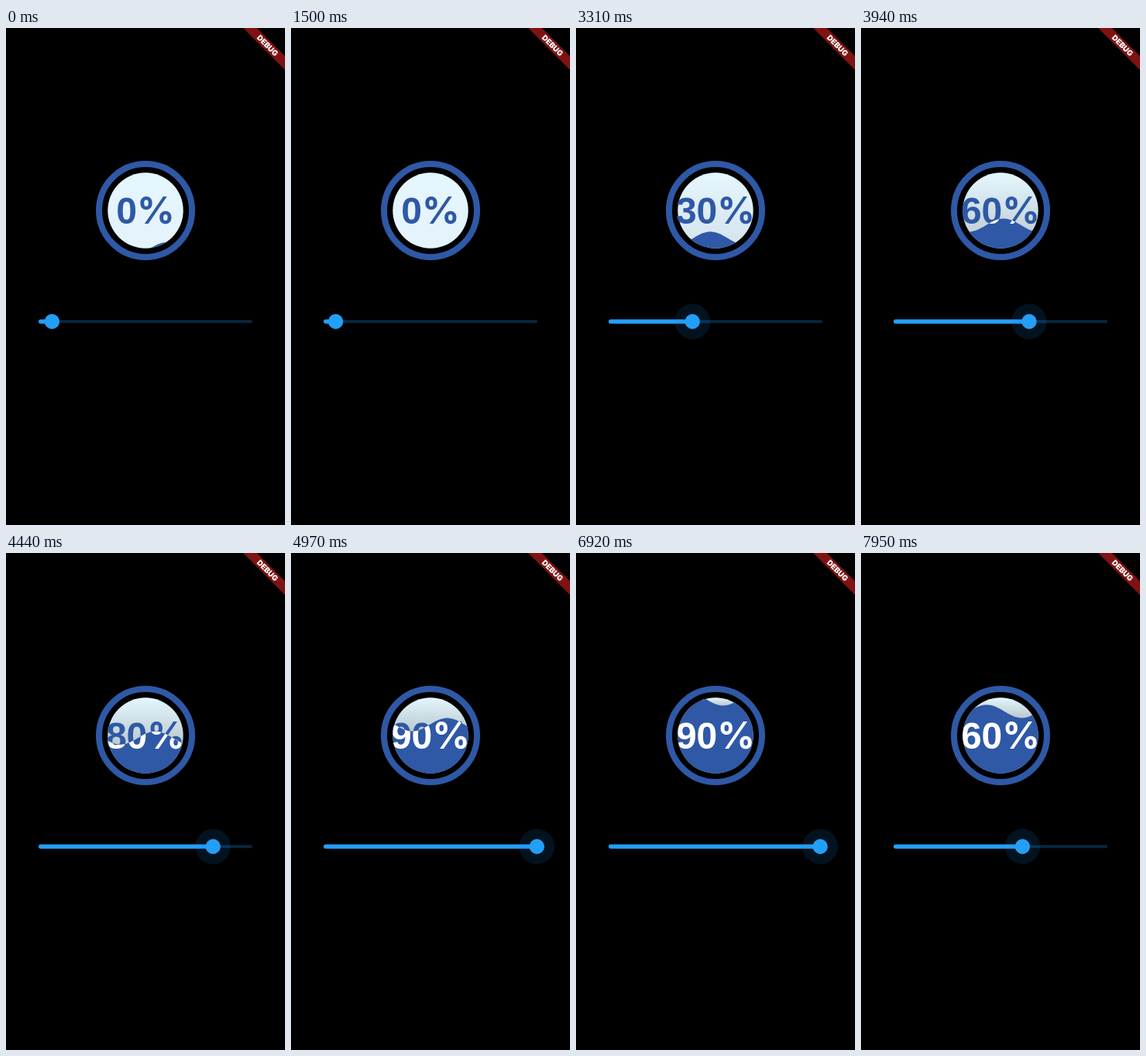
Write an HTML page that moves like this. It is 360 by 640 pixels and loops after 8000 ms.

```html
<!DOCTYPE html>
<html lang="en">
<head>
<meta charset="utf-8">
<title>Liquid progress</title>
<style>
  html, body { margin: 0; width: 100%; height: 100%; overflow: hidden; background: #000; }
  svg { display: block; width: 360px; height: 640px; }
  .label { font: bold 48px "Liberation Sans", Arial, sans-serif; text-anchor: middle; }
  .sign { font-family: Inter, sans-serif; }
  .debug { font: 900 9.8px Inter, sans-serif; text-anchor: middle; }
</style>
</head>
<body>
<svg viewBox="0 0 360 640">
  <defs>
    <clipPath id="bowl"><circle cx="180" cy="235" r="48.7"/></clipPath>
    <clipPath id="inner"><circle cx="180" cy="235" r="56"/></clipPath>
    <clipPath id="water"><path class="wave"/></clipPath>
    <linearGradient id="air" gradientUnits="userSpaceOnUse" x1="0" x2="0" y1="186">
      <stop stop-color="#e5f6fe"/>
      <stop id="shade" offset="1"/>
    </linearGradient>
  </defs>
  <rect width="360" height="640"/>

  <circle cx="180" cy="235" r="48.7" fill="url(#air)"/>
  <g clip-path="url(#inner)">
    <text class="label" x="180" y="251.5" fill="#2f58a6"><tspan class="number"></tspan><tspan class="sign">%</tspan></text>
  </g>
  <g clip-path="url(#bowl)">
    <path class="wave" fill="#2f58a6"/>
    <g clip-path="url(#water)">
      <text class="label" x="180" y="251.5" fill="#fff"><tspan class="number"></tspan><tspan class="sign">%</tspan></text>
    </g>
  </g>
  <circle cx="180" cy="235" r="60" fill="none" stroke="#2f58a6" stroke-width="8"/>

  <g fill="#239ff8">
    <rect id="rest" y="376.1" height="3.8" rx="1.9" opacity=".23"/>
    <rect id="done" x="42" y="375.2" height="5.6" rx="2.8"/>
    <circle id="halo" cy="378" fill="#1e88f0" opacity=".13"/>
    <circle id="thumb" cy="378" r="9.7"/>
  </g>

  <g transform="translate(360 0) rotate(45)">
    <rect x="-40" y="25.6" width="80" height="12.5" fill="#7f1212"/>
    <text class="debug" y="35.4" fill="#fff">DEBUG</text>
  </g>
</svg>
<script>
const LOOP = 8000, STEP = 103.2, OFFSET = 15;
const LEFT = 42, SPAN = 275.5;
const WAVELENGTH = 90, AMPLITUDE = 8.5, DRIFT = 0.017;
const EMPTY_Y = 284.5, DEPTH = 98, LAG = 1700;

// Slider drag: time, position, power of the easing that leads there
const drag = [
  [0, 59, 1], [1500, 56, 20], [2400, 79, 5], [3310, 149.5, .55], [3940, 217, 1.2],
  [4975, 317.5, 1], [6700, 317.5, 1], [7330, 265, 2.9], [7950, 208, .85]
];

function thumbX(t) {
  if (t <= 0) return drag[0][1];
  const i = drag.findIndex(key => key[0] > t);
  if (i < 0) return drag[drag.length - 1][1];
  const [t0, x0] = drag[i - 1], [t1, x1, power] = drag[i];
  return x0 + (x1 - x0) * ((t - t0) / (t1 - t0)) ** power;
}

const percent = t => Math.floor((thumbX(t) - LEFT) / SPAN * 10) * 10;

// The water trails the shown value: its mean over the last LAG ms
function fill(t, samples = 40) {
  let sum = 0;
  for (let i = 0; i < samples; i++) sum += percent(t - LAG * i / samples);
  return sum / samples / 100;
}

function wavePath(peak, level) {
  let d = "M120 300";
  for (let x = 120; x <= 240; x += 2) {
    const y = level - AMPLITUDE * Math.cos((x - peak) / WAVELENGTH * 2 * Math.PI);
    d += `L${x} ${y.toFixed(2)}`;
  }
  return d + "L240 300Z";
}

const $ = id => document.getElementById(id);
const all = name => document.querySelectorAll(name);
const set = (el, attrs) => { for (const k in attrs) el.setAttribute(k, attrs[k]); };
const mix = (a, b, p) => a.map((c, i) => Math.round(c + (b[i] - c) * p));
const waves = all(".wave"), numbers = all(".number");

function draw(time) {
  const t = Math.floor(time / STEP) * STEP + OFFSET;
  const x = thumbX(t), full = fill(t), level = EMPTY_Y - DEPTH * full;

  numbers.forEach(el => { el.textContent = percent(t); });
  const d = wavePath(207 + DRIFT * t, level);
  waves.forEach(el => set(el, { d }));

  set($("air"), { y2: level + AMPLITUDE });
  const dim = Math.min(1, full * 2.5);
  set($("shade"), { "stop-color": `rgb(${mix([229, 243, 251], [186, 201, 207], dim)})` });

  set($("rest"), { x, width: Math.max(0, LEFT + SPAN + .5 - x) });
  set($("done"), { width: x - LEFT });
  set($("halo"), { cx: x + .4, r: 22.8 * Math.min(1, Math.max(0, (t - 1400) / 150)) });
  set($("thumb"), { cx: x + .4 });
}

const start = performance.now();
function frame() {
  draw((performance.now() - start) % LOOP);
  requestAnimationFrame(frame);
}
frame();
</script>
</body>
</html>
```
